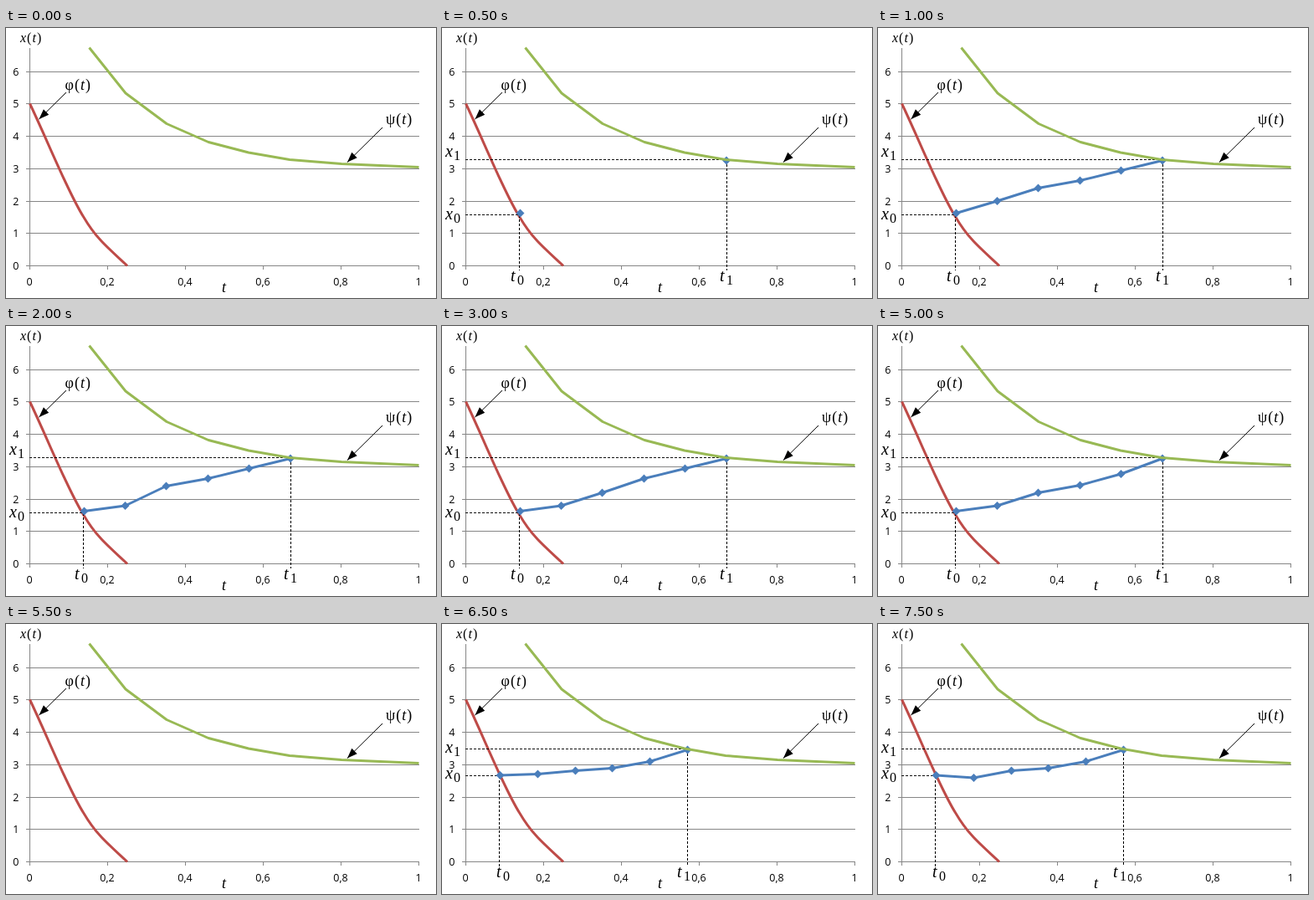
These frames come from a looping animation (514x323 px, 8000 ms). An HTML page:

```html
<!DOCTYPE html>
<html lang="en">
<head>
<meta charset="utf-8">
<title>Curve variation between two boundaries</title>
<style>
  html, body { margin: 0; width: 514px; height: 323px; overflow: hidden; background: #fff; }
  svg { display: block; }
  .grid { stroke: #868686; fill: none; shape-rendering: crispEdges; }
  .tick { font: 12.5px "Open Sans", "Noto Sans", sans-serif; }
  .math { font-family: "Liberation Serif", "Noto Serif", serif; }
  .math .i { font-style: italic; }
  .fn { letter-spacing: 1px; }
  .curve { fill: none; stroke-width: 3; stroke-linejoin: round; }
  .dash { fill: none; stroke: #000; stroke-dasharray: 3 2; shape-rendering: crispEdges; }
  .blue { fill: none; stroke: #4a7ebb; stroke-width: 3; stroke-linejoin: round; }
  .mark { fill: #4a7ebb; }
</style>
</head>
<body>
<svg width="514" height="323" viewBox="0 0 514 323">
  <path id="grid" class="grid"/>
  <g id="ticks" class="tick"></g>
  <path class="curve" stroke="#be4b48" d="M28.5 90.5C42 119 56 152 69.5 181C78 199 85 214 93 226.5C108 252 121 262 145 284.5"/>
  <path id="dash" class="dash"/>
  <polyline id="line" class="blue"/>
  <path id="marks" class="mark"/>
  <polyline class="curve" stroke="#98b954" points="99.5,23.5 143,78 192,114.5 242,136.5 290,149 339,157.5 401,162.5 493.5,166.5"/>
  <g id="arrows" stroke="#000"></g>
  <g class="math">
    <text class="fn" x="17" y="17" font-size="16"><tspan class="i">x</tspan>(<tspan class="i">t</tspan>)</text>
    <text class="fn" x="70.5" y="74" font-size="18">φ(<tspan class="i">t</tspan>)</text>
    <text class="fn" x="454" y="115" font-size="18">ψ(<tspan class="i">t</tspan>)</text>
    <text class="i" x="258" y="316" font-size="18">t</text>
  </g>
  <g id="labels" class="math"></g>
</svg>
<script>
const STEP = 500, LOOP = 8000, AXIS = 284.5;
const $ = id => document.getElementById(id);

// Each curve: its points, label baselines, label columns and the shift of each inner point.
const curves = [
  { pts: [[93.5, 221.5], [142.5, 207], [191.5, 191.5], [241.5, 182.5], [290.5, 170.5], [340, 158.5]],
    guides: [223.5, 157.5], baseY: [229, 154], tx: [82, 332], shift: [8, 8, 8, 6.5] },
  { pts: [[69.5, 181], [114.5, 179.5], [159.5, 175.5], [203.5, 172.5], [248.5, 164.5], [293.5, 150.5]],
    guides: [181.5, 149.5], baseY: [185, 154], tx: [65, 281], shift: [4.5] }
];

function drawAxes() {
  let d = "M28.5 24V289", text = "";
  for (let v = 0; v <= 6; v++) {
    const y = Math.floor(AXIS - v * 38.75) + 0.5;
    d += `M24 ${y}H494`;
    text += `<text x="15.5" y="${y + 4.5}" text-anchor="end">${v}</text>`;
  }
  for (let n = 0; n <= 5; n++) {
    const x = 28.5 + n * 93;
    d += `M${x} 285V289`;
    text += `<text x="${x - 0.5}" y="308" text-anchor="middle">${String(n / 5).replace(".", ",")}</text>`;
  }
  $("grid").setAttribute("d", d);
  $("ticks").innerHTML = text;
}

function arrow(x1, y1, x2, y2) {
  const angle = Math.atan2(y2 - y1, x2 - x1) * 180 / Math.PI;
  return `<path d="M${x1} ${y1}L${x2} ${y2}"/>` +
    `<path stroke="none" d="M0 0L-12 -4.5V4.5Z" transform="translate(${x2} ${y2})rotate(${angle})"/>`;
}

const label = (name, sub, x, y, gap) =>
  `<text x="${x}" y="${y}" font-size="20" class="i">${name}</text>` +
  `<text x="${x + gap}" y="${y + 4}" font-size="16">${sub}</text>`;

const diamond = ([x, y]) => `M${x} ${y - 5}l5 5l-5 5l-5 -5Z`;

function showCurve(curve, phase) {
  const pts = curve.pts.map(p => [...p]);
  const ends = [pts[0], pts[5]];
  // Inner points are tried one by one: first raised, then lowered and kept.
  curve.shift.forEach((s, i) => {
    const moves = phase - 2 - 2 * i;
    if (moves > 0) pts[i + 1][1] += moves === 1 ? -s : s;
  });
  const full = phase > 1;
  $("line").setAttribute("points", full ? pts.join(" ") : "");
  $("marks").setAttribute("d", (full ? pts : ends).map(diamond).join(""));
  $("dash").setAttribute("d", ends.map(([x], i) => {
    const y = curve.guides[i], col = Math.floor(x) - (i ? 0 : 1) + 0.5;
    return `M28 ${y}H${col}M${col} ${y}V290`;
  }).join(""));
  $("labels").innerHTML = [0, 1].map(i =>
    label("x", i, 4, curve.baseY[i], 10) + label("t", i, curve.tx[i], 303, 8)).join("");
}

function clearCurve() {
  $("line").setAttribute("points", "");
  $("marks").setAttribute("d", "");
  $("dash").setAttribute("d", "");
  $("labels").innerHTML = "";
}

let shown = -1;
function tick() {
  const step = Math.floor(performance.now() % LOOP / STEP);
  if (step !== shown) {
    shown = step;
    const second = step >= 11, phase = second ? step - 11 : step;
    if (phase) showCurve(curves[+second], phase);
    else clearCurve();
  }
  requestAnimationFrame(tick);
}

drawAxes();
$("arrows").innerHTML = arrow(72, 77, 39.5, 109) + arrow(450, 119, 408, 160.5);
tick();
</script>
</body>
</html>
```
